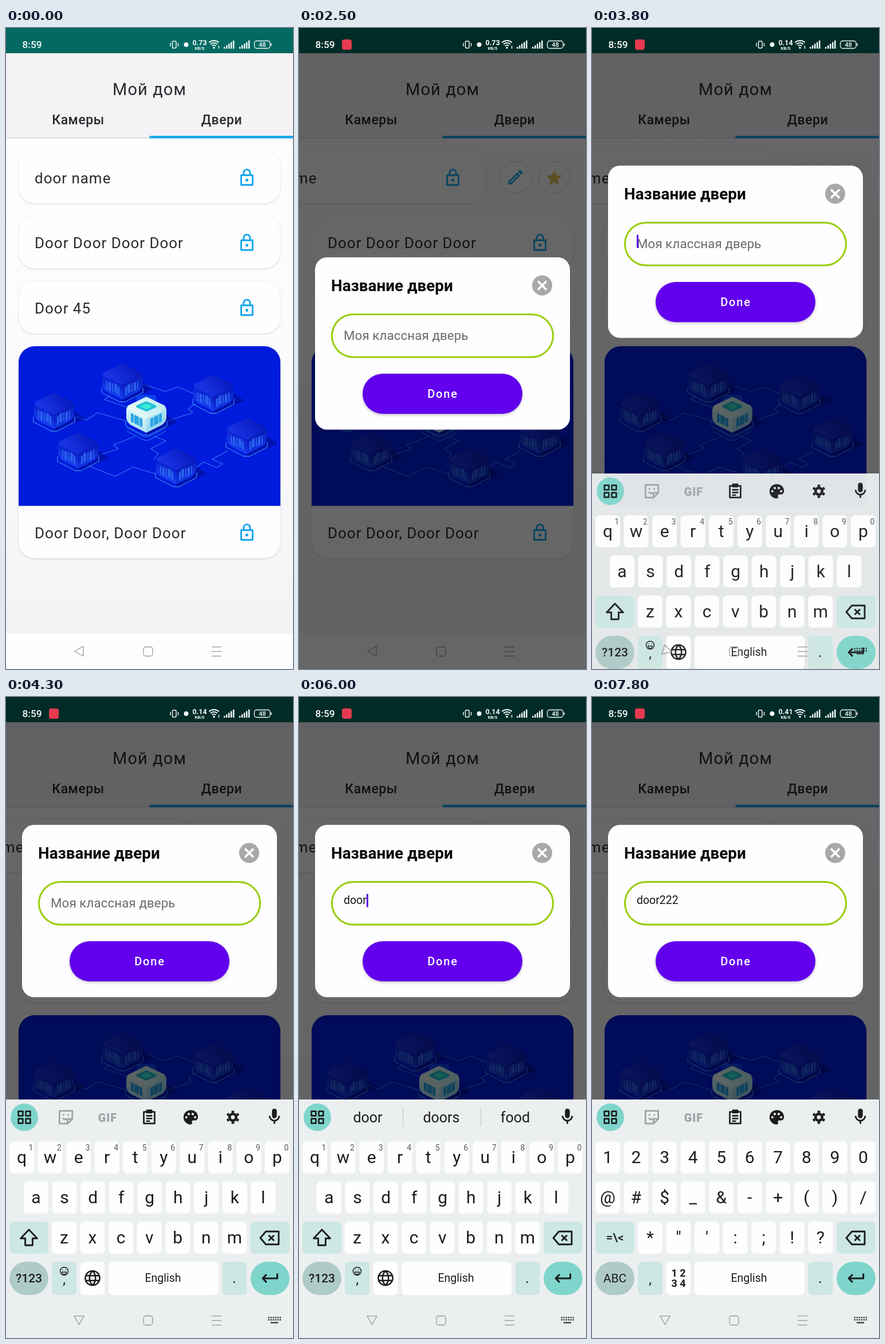
An HTML page with a canvas that plays this animation: 501 by 1118 pixels, repeating every 8 s.

```html
<!DOCTYPE html>
<html lang="ru">
<head>
<meta charset="utf-8">
<style>
html, body { margin: 0; width: 100%; height: 100%; overflow: hidden; background: #f5f4f6; }
canvas { display: block; }
</style>
</head>
<body>
<canvas width="501" height="1118"></canvas>
<script>
const c = document.querySelector('canvas').getContext('2d');
const LOOP = 8000, WHITE = '#fefdff', INK = '#2b2a2e', KEY_INK = '#1b1c1e';
const SKY = '#0ea6ee', MINT = '#cde7e3', TEAL = '#7fd5cb';
let t = 0;

const ramp = (a, b) => Math.min(1, Math.max(0, (t - a) / (b - a)));
const out = u => 1 - (1 - u) ** 3;
const during = (a, b) => t >= a && t < b;

const ICON = {
  lock: 'M5 9h14v12H5zM8 9V6a4 4 0 0 1 8 0v3M11.200 15a.8.8 0 1 0 1.600 0a.8.8 0 1 0-1.600 0',
  pencil: 'M14.06 9.02l.92.92L5.92 19H5v-.92zM17.66 3c-.25 0-.51.1-.7.29l-1.83 1.83 3.75 3.75 1.83-1.83a1 1 0 0 0 0-1.41l-2.34-2.34c-.2-.2-.45-.29-.71-.29zM14.06 6.19L3 17.25V21h3.75L17.81 9.94z',
  star: 'M12 17.3L18.2 21l-1.7-7L22 9.2l-7.2-.6L12 2 9.2 8.600 2 9.2 7.500 14 5.800 21z',
  back: 'M8 5H22V19H8L2 12zM11 9l6 6M17 9l-6 6',
  shift: 'M12 3L3 12.500H8V20H16V12.500H21z',
  enter: 'M20 7v5H5M9 8l-4 4 4 4',
  globe: 'M3 12a9 9 0 1 0 18 0a9 9 0 1 0-18 0M12 3c-5 5-5 13 0 18c5-5 5-13 0-18M4 9h16M4 15h16',
  smile: 'M3 12a9 9 0 1 0 18 0a9 9 0 1 0-18 0M7 14a5 5 0 0 0 10 0zM8 9h1.500M14.500 9h1.500',
  grid: 'M4 4h6v6H4zM14 4h6v6h-6zM4 14h6v6H4zM14 14h6v6h-6z',
  sticker: 'M4 4h16v10l-6 6H4zM14 20v-6h6M8 9h2M14 9h2M8 13a4 4 0 0 0 5 1',
  clip: 'M5 5h14v15H5zM9 3h6v3H9zM8 10h8M8 13.500h8M8 17h5',
  palette: 'M12 3a9 9 0 0 0 0 18c1.500 0 2-1 1.600-2.400C13 17 14 16 15 16h2a4 4 0 0 0 4-4.500C21 6.500 17 3 12 3zM5 12a1.500 1.500 0 1 0 3 0a1.500 1.500 0 1 0-3 0M8 8a1.500 1.500 0 1 0 3 0a1.500 1.500 0 1 0-3 0M13 8a1.500 1.500 0 1 0 3 0a1.500 1.500 0 1 0-3 0M16 12a1.500 1.500 0 1 0 3 0a1.500 1.500 0 1 0-3 0',
  gear: 'M7 12a5 5 0 1 0 10 0a5 5 0 1 0-10 0M12 2v3M12 19v3M3.300 7l2.600 1.500M18.100 15.500l2.600 1.500M3.300 17l2.600-1.500M18.100 8.500l2.600-1.500',
  mic: 'M12 2a3 3 0 0 1 3 3v6a3 3 0 0 1-6 0V5a3 3 0 0 1 3-3z',
  micStand: 'M6 11a6 6 0 0 0 12 0M12 17v4',
  triangle: 'M6 12L17.700 5.500V18.500z',
  cross: 'M7 7L17 17M17 7L7 17'
};
for (const k in ICON) ICON[k] = new Path2D(ICON[k]);

// Icons live on a 24 unit grid; without a line width they are filled.
function icon(name, x, y, scale, color, line, turn = 0) {
  c.save();
  c.translate(x, y);
  c.rotate(turn);
  c.scale(scale, scale);
  c.translate(-12, -12);
  c.lineJoin = 'round';
  c.lineWidth = line;
  c.fillStyle = c.strokeStyle = color;
  line ? c.stroke(ICON[name]) : c.fill(ICON[name], 'evenodd');
  c.restore();
}

function box(x, y, w, h, r, fill, stroke, line = 1.3) {
  c.beginPath();
  c.roundRect(x, y, w, h, r);
  if (fill) { c.fillStyle = fill; c.fill(); }
  if (stroke) { c.strokeStyle = stroke; c.lineWidth = line; c.stroke(); }
}

const disc = (x, y, r, fill, stroke, line) => box(x - r, y - r, 2 * r, 2 * r, r, fill, stroke, line);

function raised(blur, alpha, draw) {
  c.save();
  c.shadowColor = `rgba(50,45,65,${alpha})`;
  c.shadowBlur = blur;
  c.shadowOffsetY = blur / 3;
  draw();
  c.restore();
}

function text(s, x, y, size, color = INK, { weight = 400, align = 'left', gap = 0 } = {}) {
  c.font = `${weight} ${size}px Roboto, sans-serif`;
  c.letterSpacing = gap + 'px';
  c.textAlign = align;
  c.fillStyle = color;
  c.fillText(s, x, y);
}
const centered = (s, x, y, size, color = KEY_INK, weight = 400, gap = 0) =>
  text(s, x, y, size, color, { weight, align: 'center', gap });

function line(color, width, ...p) {
  c.beginPath();
  for (let i = 0; i < p.length; i += 2) c.lineTo(p[i], p[i + 1]);
  c.strokeStyle = color;
  c.lineWidth = width;
  c.lineJoin = 'round';
  c.stroke();
}

function fade(colors, x0, y0, x1, y1) {
  const g = c.createLinearGradient(x0, y0, x1, y1);
  colors.forEach((s, i) => g.addColorStop(i / (colors.length - 1), s));
  return g;
}

// Illustration: isometric blocks joined by thin lines
function rhomb(w, h, cy, fill, round) {
  c.beginPath();
  for (const p of [[0, cy - h], [w, cy], [0, cy + h], [-w, cy]]) c.lineTo(...p);
  c.closePath();
  c.fillStyle = c.strokeStyle = fill;
  c.lineWidth = round;
  c.lineJoin = 'round';
  c.fill();
  c.stroke();
}

function cube(x, y, lit) {
  const look = lit
    ? { left: ['#d6f6f6', '#b4e4f4'], right: ['#b4e6f2', '#98d4f0'], top: ['#eafaf8', '#bdeef2'], pane: '#2ba4e4', edge: '#2f86f5' }
    : { left: ['#0a20cc', '#1540ee'], right: ['#0818b8', '#1236e4'], top: ['#1a34e8', '#0a1cc0'], pane: '#3272f4', edge: '#3a86f8' };
  c.save();
  c.translate(x, y);
  c.beginPath();
  for (const p of [[0, 38], [54, 14], [34, 0], [0, 20]]) c.lineTo(...p);
  c.fillStyle = 'rgba(0,8,130,.5)';
  c.fill();
  line(look.edge, 1.3, -36, 11, -36, 20, -5, 36, 5, 36, 36, 20, 36, 11);
  if (lit) for (const d of [6, 12]) line(look.edge, 1, -34, 17 + d, -4, 33 + d, 4, 33 + d, 34, 17 + d);
  for (const side of [-1, 1]) {
    c.save();
    c.transform(side, -.5, 0, 1, 0, 0);
    box(0, 3, 35, 29, [0, 6, 9, 0], fade(side < 0 ? look.left : look.right, 0, 4, 0, 32));
    c.globalAlpha = lit ? 1 : .75;
    c.fillStyle = look.pane;
    if (lit) for (const px of [7, 13, 22]) c.fillRect(px, 11, px === 13 ? 8 : 5, 15);
    else for (const [px, w] of [[5, 3], [9, 5], [16, 2], [20, 4], [26, 2]]) c.fillRect(px, 11 + px % 3, w, 15);
    c.restore();
  }
  rhomb(29, 14, -12, fade(look.top, -20, 4, 20, -26), 9);
  if (lit) {
    rhomb(15, 6.5, -14, '#22c4d4', 5);
    rhomb(7, 3, -14, '#3cecd8', 3);
  }
  c.restore();
}

function illustration() {
  box(22, 555, 457, 278.500, [28, 28, 0, 0], '#001bdc');
  const wire = (...p) => line('#3478f2', 1.1, ...p);
  wire(238, 621, 278, 634, 300, 626, 328, 638);
  wire(118, 676, 140, 684, 160, 671, 212, 686);
  wire(182, 641, 172, 648, 212, 662);
  wire(331, 655, 318, 664, 326, 671, 283, 685);
  wire(160, 746, 196, 734, 188, 727, 226, 712);
  wire(140, 762, 190, 782, 222, 766, 262, 778);
  wire(258, 712, 279, 720, 253, 734, 266, 742, 258, 753);
  wire(330, 768, 345, 757, 368, 767, 378, 760, 360, 752, 386, 738);
  for (const [x, y] of [[203, 616], [362, 636], [84, 667], [126, 736], [297, 764], [420, 711]]) cube(x, y);
  box(228, 640, 34, 20, 4, 'rgba(20,90,250,.6)');
  cube(245, 674, true);
}

function card(y, h, label, dx = 0) {
  raised(3, .2, () => box(22 + dx, y, 457, h, 28, WHITE));
  if (h > 100) illustration();
  text(label, 50 + dx, y + h - 35.500, 26, INK, { gap: .97 });
  icon('lock', 420.500 + dx, y + h - 45, 1.42, SKY, 2);
}

function nav(color, turn) {
  icon('triangle', 127.500, 1087, 1.3, color, 1, turn * -Math.PI / 2);
  box(240, 1079.500, 16, 16, 4, null, color);
  for (const y of [1079.500, 1087.500, 1095.500]) line(color, 1.3, 359, y, 376, y);
}

function app() {
  c.fillStyle = fade(['#fdfcff', '#fbfafc', '#f3f3f4'], 0, 192, 0, 1056);
  c.fillRect(0, 192, 501, 864);
  c.fillStyle = '#f4f2f5';
  c.fillRect(0, 44, 501, 148);
  c.fillStyle = '#026a62';
  c.fillRect(0, 0, 501, 44);
  centered('Мой дом', 250.500, 117, 29, INK, 400, 1.1);
  centered('Камеры', 126, 168, 23, INK, 500, .5);
  centered('Двери', 376.500, 168, 23, INK, 500, .5);
  line('#d3d1d5', 1.5, 0, 191.500, 250, 191.500);
  line('#1aa7ee', 4.5, 250.500, 190.250, 501, 190.250);

  const swipe = out(ramp(1100, 1500));
  if (swipe > 0) {
    c.globalAlpha = swipe;
    for (const x of [378.500, 445.500]) disc(x, 260.500, 27.500, WHITE, '#e0dfe5');
    icon('pencil', 378, 260.500, 1.4, SKY);
    icon('star', 445.500, 261.500, 1.38, '#e0c853');
    c.globalAlpha = 1;
  }
  card(214, 92, 'door name', -152 * swipe);
  card(328, 91.500, 'Door Door Door Door');
  card(441.500, 91.500, 'Door 45');
  card(555, 370, 'Door Door, Door Door');

  c.fillStyle = WHITE;
  c.fillRect(0, 1056, 501, 62);
}

function status() {
  const W = '#f4fbfa';
  text('8:59', 28.500, 35, 17.300, W, { weight: 500 });
  c.globalAlpha = ramp(200, 300);
  box(75, 20, 17, 18, 4, '#e63a50');
  c.globalAlpha = 1;
  box(290.500, 23, 6.500, 12, 1.5, null, W, 1.5);
  for (const x of [287, 300.500]) line(W, 1.4, x, 26, x, 32);
  disc(314.500, 29, 4, W);
  centered(t < 3200 ? '0.73' : t < 7700 ? '0.14' : '0.41', 338, 30, 12.500, W, 700);
  centered('KB/S', 338, 37.500, 7.500, W, 700);
  for (const r of [5, 9, 13]) {
    c.beginPath();
    c.arc(363, 35, r, -2.3, -.84);
    c.strokeStyle = W;
    c.lineWidth = 2;
    c.stroke();
  }
  disc(363, 34.500, 1.8, W);
  line(W, 1.5, 371.500, 31, 371.500, 36);
  for (const x of [380, 407]) for (let i = 0; i < 5; i++) {
    c.fillStyle = W;
    c.fillRect(x + i * 4, 33 - i * 2.8, 2.5, 3 + i * 2.8);
  }
  box(433.500, 22.500, 27.500, 13, 4, null, W);
  line(W, 1.5, 463, 27, 463, 31);
  centered('48', 447.500, 33, 11, W, 500);
}

// Typing: moment, key, touch point
const PRESSES = [
  [4900, 'd', 152, 884], [5150, 'o', 422, 823], [5450, 'o', 424, 822], [5750, 'r', 176, 815],
  [6100, '?123', 42, 1016], [6650, '2', 66, 808], [6950, '2', 67, 809], [7250, '2', 66, 809]
];
const pressed = () => PRESSES.find(([at]) => during(at, at + 180));
const typed = () => PRESSES.filter(p => t >= p[0] && p[1].length < 2).map(p => p[1]).join('');
const suggestions = s => s.length > 4
  ? [s, 'door ' + s.slice(4), 'door ' + s.slice(4) + 'nd']
  : { d: ['d', 'do', 'did'], do: ['do', 'so', 'door'], doo: ['doo', 'door', 'doors'], door: ['door', 'doors', 'food'] }[s];

function dialog() {
  const open = out(ramp(2200, 2500));
  if (!open) return;
  c.fillStyle = `rgba(0,0,0,${.595 * open})`;
  c.fillRect(0, 0, 501, 1118);
  const y = Math.round(400 - 177 * out(ramp(3580, 3986)));
  c.save();
  c.globalAlpha = open;
  c.translate(250.500, y + 150);
  c.scale(.9 + .1 * open, .9 + .1 * open);
  c.translate(-250.500, -150);
  box(28, 0, 445, 300.500, 21, WHITE);
  text('Название двери', 56, 58.500, 27.800, '#09080b', { weight: 700 });
  disc(424.500, 49, 17.500, '#a9a7aa');
  icon('cross', 424.500, 49, 1.5, '#fff', 2.5);
  box(57.500, 99.500, 386, 74.500, 37.250, null, '#98cc05', 3);
  const s = typed();
  if (s) text(s, 78, 138, 19.500, '#17161a');
  else text('Моя классная дверь', 78, 144, 22.300, '#6c6a6f', { gap: .1 });
  raised(5, .3, () => box(111, 203, 279, 70, 35, '#6200ee'));
  centered('Done', 251, 245, 20, '#fff', 500, 1.8);
  const last = PRESSES.reduce((m, [at]) => t >= at ? at : m, 3500);
  if (t >= 3500 && (t - last) % 1000 < 500) {
    c.font = '400 19.5px Roboto, sans-serif';
    c.letterSpacing = '0px';
    c.fillStyle = '#5a10e0';
    c.fillRect(78 + c.measureText(s).width, 120.500, 3, 23);
  }
  c.restore();
}

function toolbar(s) {
  disc(32, 733, 24, TEAL);
  icon('grid', 32, 733, 1.3, KEY_INK, 2);
  icon('mic', 468.500, 732, 1.4, KEY_INK);
  icon('micStand', 468.500, 732, 1.4, KEY_INK, 2);
  if (s && t < 7700) {
    suggestions(s).forEach((w, i) => centered(w, [120, 248.500, 377.500][i], 742, 25));
    for (const x of [181.500, 317.500]) line('#c9cccd', 1.3, x, 716, x, 749);
    return;
  }
  icon('sticker', 104.500, 733, 1.4, '#9fa2a4', 2);
  centered('GIF', 177.500, 740.500, 20, '#9fa2a4', 900, 1);
  icon('clip', 250, 733, 1.35, KEY_INK, 2);
  icon('palette', 322.500, 733, 1.4, KEY_INK);
  icon('gear', 396, 733, 1.15, KEY_INK, 4);
}

function keyboard() {
  const up = out(ramp(3584, 4084));
  if (!up) return;
  const symbols = t >= 6200, press = pressed();
  let popup;
  c.save();
  c.translate(0, Math.round(416 * (1 - up)));
  c.globalAlpha = ramp(3550, 3813);
  c.fillStyle = '#eceff0';
  c.fillRect(0, 702, 501, 416);
  toolbar(typed());

  const row = (keys, x0, y, digits) => [...keys].forEach((k, i) => {
    const x = x0 + i * 49.550, held = press && press[1] === k;
    if (held) popup = [k, x + 21.500, y - 46];
    else box(x, y, 43, 56, 7, WHITE);
    const ink = held ? '#a9acae' : KEY_INK;
    centered(k, x + 21.500, y + 37.500, 30, ink);
    if (digits) centered((i + 1) % 10, x + 37.500, y + 16, 14, held ? ink : '#55585a');
  });
  const wide = (x, y, w, fill, r = 7, h = 56) => box(x, y, w, h, r, fill);
  if (symbols) {
    row('1234567890', 6, 775);
    row('@#$_&-+()/', 6, 845);
    row('*"\':;!?', 80, 915);
  } else {
    row('qwertyuiop', 6, 775, true);
    row('asdfghjkl', 31, 845);
    row('zxcvbnm', 80, 915);
  }
  wide(6, 915, 68, MINT);
  if (symbols) centered('=\\<', 40, 950, 21, KEY_INK, 500);
  else icon('shift', 40, 943.500, 1.6, KEY_INK, 1.8);
  wide(427, 915, 68, MINT);
  icon('back', 460, 943.500, 1.6, KEY_INK, 1.8);

  wide(6, 985, 68, press && press[1] === '?123' ? '#98b5b0' : '#afcbc7', 29, 58);
  centered(symbols ? 'ABC' : '?123', 40, 1021, 21, KEY_INK, symbols ? 400 : 500);
  wide(80, 985, 43, MINT, 7, 58);
  centered(',', 101.500, 1024, 24);
  wide(129.500, 985, 43, WHITE, 7, 58);
  if (symbols) {
    centered('1 2', 151, 1011, 18, KEY_INK, 700);
    centered('3 4', 151, 1029, 18, KEY_INK, 700);
  } else {
    icon('smile', 101.500, 1001.500, .78, KEY_INK, 1.9);
    icon('globe', 151, 1013.500, 1.4, KEY_INK, 1.8);
  }
  wide(179, 985, 192, WHITE, 7, 58);
  centered('English', 274, 1020, 19.500);
  wide(377.500, 985, 43, MINT, 7, 58);
  centered('.', 398.500, 1022, 26);
  wide(427, 985, 68, TEAL, 29, 58);
  icon('enter', 460, 1014, 1.7, KEY_INK, 1.8);

  if (popup) {
    const [k, x, y] = popup;
    raised(7, .35, () => disc(x, y, 37.500, WHITE));
    centered(k, x, y + 11, 32);
    for (const d of [-5.500, 0, 5.500]) disc(x + d, y + 27, 1.4, KEY_INK);
  }
  c.restore();
}

function navOverKeys() {
  c.globalAlpha = ramp(3600, 3800);
  nav('#97999c', ramp(3600, 4000));
  c.fillStyle = '#44474a';
  for (let r = 0; r < 2; r++) for (let i = 0; i < 6; i++) c.fillRect(457.500 + i * 4, 1081 + r * 4, 2.5, 2.5);
  c.fillRect(462, 1090, 13, 2.5);
  c.globalAlpha = 1;
}

function touch() {
  const dot = (x, y, a = 1) => {
    c.globalAlpha = a;
    disc(x, y, 15.500, 'rgba(244,245,252,.7)', '#c0c3d9', 2);
    c.globalAlpha = 1;
  };
  const press = pressed();
  if (during(1100, 1500)) dot(400 - 152 * out(ramp(1100, 1500)), 262);
  if (during(1700, 2400)) dot(393, 247, ramp(1700, 1800) * (1 - ramp(2250, 2400)));
  if (during(3400, 3600)) dot(205, 540, 1 - ramp(3500, 3600));
  if (press) dot(press[2], press[3]);
}

function frame(now) {
  t = now % LOOP;
  c.clearRect(0, 0, 501, 1118);
  app();
  if (t < 3600) nav('#9a999c', 0);
  dialog();
  keyboard();
  if (t >= 3600) navOverKeys();
  status();
  touch();
  requestAnimationFrame(frame);
}
requestAnimationFrame(frame);
</script>
</body>
</html>
```
